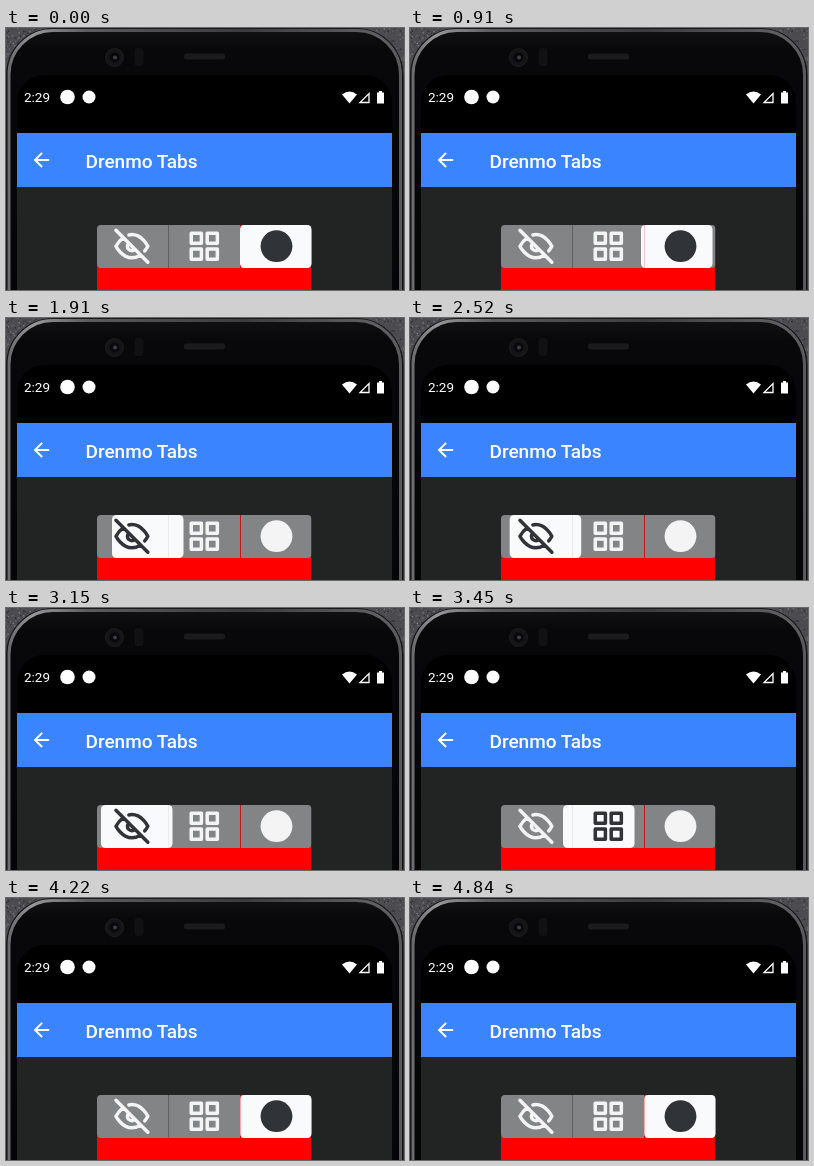
An HTML page for the animation above (5220 ms loop, 398 px wide and 262 px high).

```html
<!DOCTYPE html>
<html lang="en">
<head>
<meta charset="utf-8">
<title>Tabs</title>
<style>
html, body { margin: 0; width: 100%; height: 100%; overflow: hidden; background: #000; }
svg { display: block; width: 100%; height: 100%; }
text { font-family: Roboto, sans-serif; fill: #fff; }
.icons { fill: none; stroke: currentColor; stroke-width: 2.4; stroke-linecap: round; stroke-linejoin: round; }
</style>
</head>
<body>
<svg viewBox="0 0 398 262" xmlns="http://www.w3.org/2000/svg">
  <defs>
    <linearGradient id="body" x1="0" y1="0" x2="0" y2="1">
      <stop offset="0" stop-color="#121214"/>
      <stop offset=".06" stop-color="#08080a"/>
      <stop offset="1" stop-color="#050506"/>
    </linearGradient>
    <linearGradient id="rim" x1="0" y1="0" x2="1" y2="0">
      <stop offset="0" stop-color="#6c6c6f"/>
      <stop offset=".06" stop-color="#98989b"/>
      <stop offset=".2" stop-color="#5c5c5e"/>
      <stop offset=".6" stop-color="#3c3c3e"/>
      <stop offset=".94" stop-color="#606063"/>
      <stop offset="1" stop-color="#5a5a5d"/>
    </linearGradient>
    <clipPath id="bar"><rect x="91" y="197" width="214.5" height="43" rx="4"/></clipPath>
    <clipPath id="window"><rect class="thumb" y="197" width="71.5" height="43" rx="4.5"/></clipPath>
    <g id="icons" class="icons">
      <g transform="translate(108.5 200.8) scale(1.45)">
        <path d="M17.94 17.94A10.07 10.07 0 0 1 12 20c-7 0-11-8-11-8a18.45 18.45 0 0 1 5.06-5.94M9.9 4.24A9.12 9.12 0 0 1 12 4c7 0 11 8 11 8a18.5 18.5 0 0 1-2.16 3.19m-6.72-1.07a3 3 0 1 1-4.24-4.24M1 1l22 22"/>
      </g>
      <g transform="translate(180.9 200.8) scale(1.45)">
        <path d="M3 3h7v7H3zM14 3h7v7h-7zM14 14h7v7h-7zM3 14h7v7H3z"/>
      </g>
      <circle cx="270.5" cy="218.2" r="15.9" fill="currentColor" stroke="none"/>
    </g>
  </defs>

  <!-- phone -->
  <rect width="398" height="262" fill="#4c4c50"/>
  <g id="specks"></g>
  <rect x=".5" y=".5" width="396.5" height="340" rx="46" fill="url(#body)" stroke="#1a1a1b"/>
  <rect x="3" y="2.5" width="391.5" height="340" rx="44" fill="none" stroke="url(#rim)" stroke-width="3"/>
  <circle cx="108.5" cy="29.5" r="9" fill="#151517" stroke="#1d1d1f"/>
  <circle cx="108.5" cy="29.5" r="5" fill="#09090b"/>
  <circle cx="109" cy="29.5" r="2" fill="#3c3e44"/>
  <rect x="128.5" y="20" width="9" height="18" rx="3" fill="#111113"/>
  <rect x="178" y="25.5" width="41" height="6" rx="2.5" fill="#1b1b1d"/>
  <path d="M11 262V74a27 27 0 0 1 27-27H359a27 27 0 0 1 27 27V262z" fill="#000"/>

  <!-- status bar -->
  <text x="18" y="74.2" font-size="13.5">2:29</text>
  <g fill="#fff">
    <circle cx="61.5" cy="69" r="7.3"/>
    <circle cx="83" cy="69" r="6.5"/>
    <path d="M336 66.5Q343.500 60.500 351 66.500L343.500 75.500z"/>
    <path d="M363 65.500V74.500H354z" fill="none" stroke="#fff" stroke-width="1.300"/>
    <path d="M371 64.500h2V63h3v1.500h2V75.500h-7z"/>
  </g>

  <!-- app -->
  <rect x="11" y="105" width="375" height="54" fill="#3a85ff"/>
  <rect x="11" y="159" width="375" height="103" fill="#222423"/>
  <path transform="translate(23.800 120.300) scale(.97)" fill="#fff" d="M20 11H7.830l5.590-5.590L12 4l-8 8 8 8 1.410-1.410L7.830 13H20z"/>
  <text x="79.5" y="139.5" font-size="19" font-weight="500">Drenmo Tabs</text>

  <!-- segmented control -->
  <rect x="91" y="238" width="214" height="24" fill="#f00"/>
  <g clip-path="url(#bar)">
    <rect x="91" y="197" width="214.5" height="43" fill="#838485"/>
    <rect x="162" y="197" width="1" height="43" fill="#606162"/>
    <rect x="234" y="197" width="1" height="43" fill="#c41616"/>
  </g>
  <use href="#icons" color="#f4f4f5"/>
  <rect class="thumb" y="197" width="71.5" height="43" rx="4.5" fill="#f9fafc"/>
  <g clip-path="url(#window)">
    <rect x="162" y="197" width="1" height="43" fill="#000" opacity=".06"/>
    <rect id="seam" x="234" y="197" width="1" height="43" fill="#f00"/>
    <use href="#icons" color="#303337"/>
  </g>
</svg>
<script>
const LOOP = 5220, START = 907, STEP = 77;
// [step, thumb x]: drag left, settle, drag right
const KEYS = [[-1, 234], [0, 231], [6, 172], [13, 106], [18, 100], [19.5, 100],
  [24, 91], [28, 91], [29, 95], [37, 212], [42, 234]];
const thumbs = document.querySelectorAll('.thumb');
const seam = document.getElementById('seam');

const rate = i => (KEYS[i + 1][1] - KEYS[i][1]) / (KEYS[i + 1][0] - KEYS[i][0]);

// Harmonic mean of both neighbours keeps the curve monotone.
function slope(i) {
  if (i === 0 || i === KEYS.length - 1) return 0;
  const a = rate(i - 1), b = rate(i);
  return a * b > 0 ? 2 * a * b / (a + b) : 0;
}

function place(k) {
  const last = KEYS.length - 1;
  if (k <= KEYS[0][0]) return KEYS[0][1];
  if (k >= KEYS[last][0]) return KEYS[last][1];
  const i = KEYS.findIndex(p => p[0] > k) - 1;
  const [k0, x0] = KEYS[i], [k1, x1] = KEYS[i + 1];
  const d = k1 - k0, u = (k - k0) / d, v = 1 - u;
  return v * v * (1 + 2 * u) * x0 + u * u * (3 - 2 * u) * x1
    + d * u * v * (v * slope(i) - u * slope(i + 1));
}

function draw(t) {
  const k = Math.floor((t - START) / STEP);
  const x = place(k).toFixed(2);
  thumbs.forEach(el => el.setAttribute('x', x));
  seam.setAttribute('opacity', k < 0 ? 0 : k < 6 ? .2 : k < 29 ? .1 : .32);
}

// grainy surface behind the phone's corners
let seed = 7;
const rnd = () => (seed = seed * 16807 % 2147483647) / 2147483647;
let grain = '';
for (let i = 0; i < 300; i++) {
  const x = rnd() * 30, y = rnd() * 34, g = Math.round(40 + rnd() * 90);
  grain += `<circle cx="${(i % 2 ? 398 - x : x).toFixed(1)}" cy="${y.toFixed(1)}" r=".8" fill="rgb(${g},${g},${g + 5})"/>`;
}
document.getElementById('specks').innerHTML = grain;

const begin = performance.now();
function tick() {
  draw((performance.now() - begin) % LOOP);
  requestAnimationFrame(tick);
}
tick();
</script>
</body>
</html>
```
